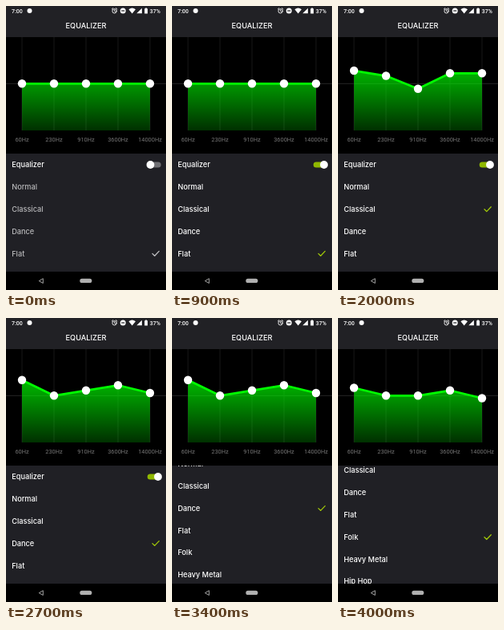
These frames come from a looping animation (200x356 px, 4500 ms). An HTML page:

```html
<!DOCTYPE html>
<html lang="en">
<head>
<meta charset="utf-8">
<title>Equalizer</title>
<style>
  html, body { margin: 0; width: 100%; height: 100%; overflow: hidden; background: #000; }
  svg { display: block; width: 100%; height: 100%; }
  text { fill: #fff; }
  .ui { font: 500 9.2px Inter, sans-serif; }
  .axis text { font: 7.4px Roboto, sans-serif; fill: #777; text-anchor: middle; }
  .status text { font: 500 7px Roboto, sans-serif; }
  .line { fill: none; stroke-linecap: round; stroke-linejoin: round; }
</style>
</head>
<body>
<svg viewBox="0 0 200 356">
  <defs>
    <linearGradient id="fade" gradientUnits="userSpaceOnUse" x1="0" y1="39" x2="0" y2="156">
      <stop offset="0" stop-color="#0f0"/>
      <stop offset="1" stop-color="#0f0" stop-opacity=".19"/>
    </linearGradient>
    <clipPath id="listArea"><rect y="185" width="200" height="148"/></clipPath>
  </defs>
  <rect width="200" height="356"/>
  <rect width="200" height="39" fill="#212125"/>

  <g class="status" fill="#fff">
    <text x="7" y="8.6">7:00</text>
    <circle cx="29.5" cy="6" r="3"/>
    <g class="line" stroke="#fff" stroke-width=".9">
      <circle cx="135.6" cy="6.3" r="2.7"/>
      <path d="M135.6 4.8V6.4l1.1.8M132.3 4l1.5-1.3M138.9 4l-1.5-1.3"/>
    </g>
    <circle cx="146.2" cy="6" r="3.5"/>
    <rect x="144.2" y="5.4" width="4" height="1.2" fill="#212125"/>
    <path d="M153.4 4.2Q157.7 1 162 4.2L157.7 9.5zM163.3 9.3h6.6V2.7z"/>
    <path d="M173.2 3.2h1V2.5h1.8v.7h1V9.5h-3.8z"/>
    <text x="179.8" y="8.6">37%</text>
  </g>
  <text class="ui" x="100" y="28.4" text-anchor="middle">EQUALIZER</text>

  <path d="M0 97.3H200" stroke="#303030" stroke-width=".8"/>
  <g id="grid" stroke="#202020" stroke-width=".8"></g>
  <path id="area" fill="url(#fade)"/>
  <path id="curve" class="line" stroke="#0f0" stroke-width="2.7"/>
  <g id="knobs" fill="#fff"></g>
  <g id="axis" class="axis"></g>

  <rect y="185" width="200" height="148" fill="#202025"/>
  <g clip-path="url(#listArea)">
    <g id="list" class="ui">
      <text x="7.2" y="202.3">Equalizer</text>
      <rect id="track" x="176.7" y="195.5" width="17" height="7" rx="3.5"/>
      <circle id="thumb" cy="199" r="4.9" fill="#fff"/>
      <g id="rows"></g>
      <path id="check" class="line" d="M183 .2L185.8 3 191.3-2.8" stroke-width="1.25" stroke-linecap="butt"/>
    </g>
  </g>

  <path class="line" d="M41.6 344.4L46.3 341.7V347.1z" stroke="#b8b8b8" stroke-width=".9"/>
  <rect x="92.3" y="341.8" width="15" height="5.2" rx="2.6" fill="#b0b0b0"/>
</svg>
<script>
const LOOP = 4500, ROW = 27.8, FIRST = 199, ZERO = 97.3, PX_PER_DB = 3.25;
const bands = ['60Hz', '230Hz', '910Hz', '3600Hz', '14000Hz'];
const rows = ['Normal', 'Classical', 'Dance', 'Flat', 'Folk', 'Heavy Metal', 'Hip Hop'];
const gains = {
  Normal: [3, 0, 0, 0, 3],
  Classical: [5, 3, -2, 4, 4],
  Dance: [6, 0, 2, 4, 1],
  Flat: [0, 0, 0, 0, 0],
  Folk: [3, 0, 0, 2, -1]
};
// Each table holds [start time, value].
const presets = [[0, 'Flat'], [1400, 'Normal'], [2000, 'Classical'], [2700, 'Dance'], [4000, 'Folk']];
const scrolls = [[0, 0], [3300, 23.3], [3400, 44], [3500, 58], [3600, 63.5]];
const switching = [[0, 0], [500, .15], [600, .6], [700, .95], [800, 1]];

const $ = id => document.getElementById(id);
const at = (table, t) => table.findLast(([start]) => start <= t)[1];
const bandX = i => 20 + 40 * i;
const rowY = name => FIRST + ROW * (rows.indexOf(name) + 1);
const mix = (a, b, k) => `rgb(${a.map((v, i) => Math.round(v + (b[i] - v) * k))})`;

function add(parent, tag, attrs, text = '') {
  const el = document.createElementNS('http://www.w3.org/2000/svg', tag);
  for (const key in attrs) el.setAttribute(key, attrs[key]);
  el.textContent = text;
  return $(parent).appendChild(el);
}

const knobs = bands.map((label, i) => {
  const x = bandX(i);
  add('grid', 'path', { d: `M${x} 39V156` });
  add('axis', 'text', { x, y: 170.4 }, label);
  return add('knobs', 'circle', { cx: x, r: 5.2 });
});
rows.forEach(name => add('rows', 'text', { x: 7.2, y: rowY(name) + 3.3 }, name));
const labels = [...$('rows').children];

function draw(t) {
  const preset = at(presets, t), on = at(switching, t), active = t >= 500;
  const ys = gains[preset].map(db => ZERO - db * PX_PER_DB);
  const path = 'M' + ys.map((y, i) => `${bandX(i)} ${y}`).join('L');

  $('curve').setAttribute('d', path);
  $('area').setAttribute('d', path + 'V156H20z');
  knobs.forEach((knob, i) => knob.setAttribute('cy', ys[i]));

  $('list').setAttribute('transform', `translate(0 ${-at(scrolls, t)})`);
  $('thumb').setAttribute('cx', 180.5 + 9.5 * on);
  $('track').setAttribute('fill', mix([112, 112, 116], [143, 184, 0], on));
  labels.forEach(label => label.style.fill = active ? '#fff' : '#b8b8ba');
  $('check').setAttribute('stroke', active ? '#a4cc08' : '#c4c4c6');
  $('check').setAttribute('transform', `translate(0 ${rowY(preset)})`);
}

const began = performance.now();
function tick() {
  draw((performance.now() - began) % LOOP);
  requestAnimationFrame(tick);
}
tick();
</script>
</body>
</html>
```
